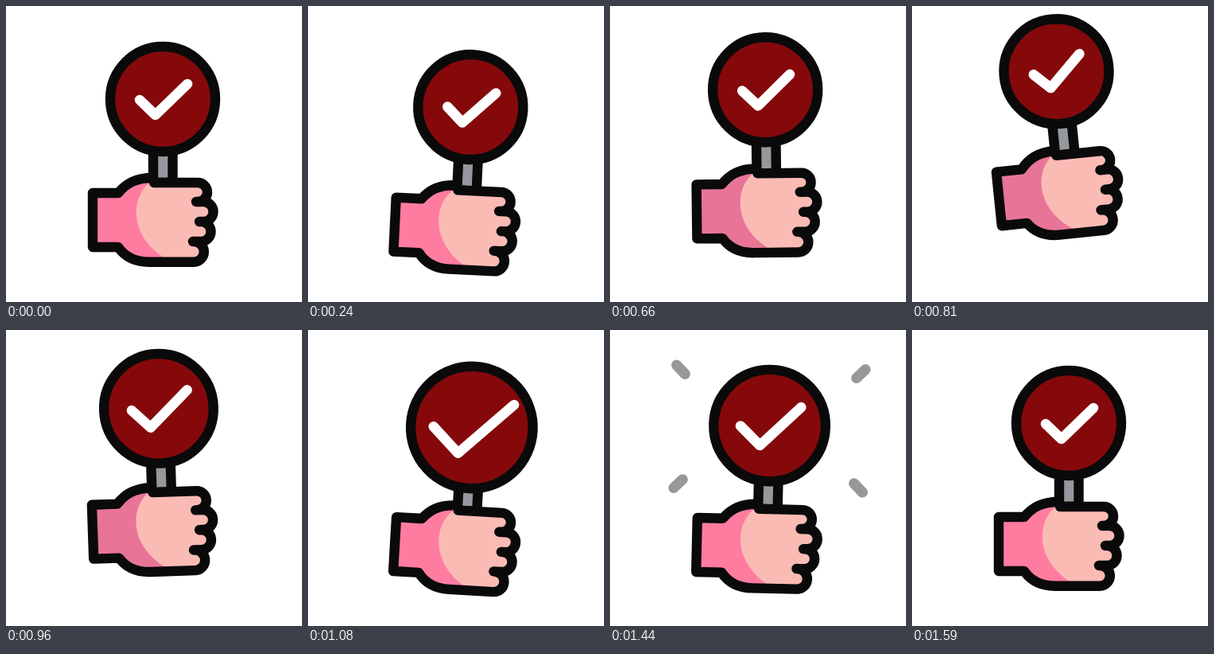
Write an HTML page that moves like this. It is 372x372 px and loops after 1620 ms.

```html
<!DOCTYPE html>
<html lang="en">
<head>
<meta charset="utf-8">
<title>Approval paddle</title>
<style>
  html, body { margin: 0; width: 100%; height: 100%; overflow: hidden; background: #fff; }
  svg { display: block; width: 100vw; height: 100vh; }
  .ink { stroke: #0a0a0a; stroke-width: 12.4; stroke-linecap: round; stroke-linejoin: round; }
  #marks { stroke-width: 13.2; }
  #check { fill: none; stroke: #fff; stroke-width: 12.6; stroke-linecap: round; stroke-linejoin: round; }
</style>
</head>
<body>
<svg viewBox="0 0 372 372">
  <defs>
    <path id="fist" d="M184 216 C163 216 151 223 141 235 H109 V303 H141 C150 316 164 321.7 180 321.7 H236
      A12.8 12.8 0 0 0 236 296 H235 H245 A12.5 12.5 0 0 0 245 271 H243 H248 A12.5 12.5 0 0 0 248 246
      H239 H241 A12 12 0 0 0 241 222 H186"/>
    <clipPath id="inside"><use href="#fist"/></clipPath>
  </defs>
  <g id="paddle">
    <g id="marks" class="ink"></g>
    <rect class="ink" x="185" y="180" width="24.5" height="42" fill="#95999d"/>
    <g transform="translate(197 117)">
      <circle id="disc" class="ink" fill="#85090b"/>
      <path id="check"/>
    </g>
    <use id="skin" href="#fist"/>
    <path clip-path="url(#inside)" fill="#fbbbb5" d="M183 220 C154 240 154 295 209 322 H270 V215 H183 Z"/>
    <use class="ink" href="#fist" fill="none"/>
  </g>
</svg>
<script>
  const LOOP = 1620, REST = 1590;
  const $ = id => document.getElementById(id);
  const clamp = x => Math.min(1, Math.max(0, x));

  // Key poses: time in ms, tilt in degrees, drop in pixels.
  const poses = [
    [0, 0, 0], [150, 0, 0],
    [410, 7.9, 26.5],   // dip
    [845, -7, -39.5],   // lift
    [1105, 4.4, 9],     // stamp
    [REST, 0, 0], [LOOP, 0, 0],
  ];

  function poseAt(t) {
    const i = poses.findIndex(([time]) => time > t);
    const from = poses[i - 1], to = poses[i];
    const k = (t - from[0]) / (to[0] - from[0]);
    return from.map((v, n) => v + (to[n] - v) * k);
  }

  const tick = [[-29, 1], [-9.3, 20], [31, -19]];
  const corners = [[-1, -1], [1, -1], [1, 1], [-1, 1]];
  const dashes = corners.map(() =>
    $('marks').appendChild(document.createElementNS('http://www.w3.org/2000/svg', 'path')));

  function draw(t) {
    const [, tilt, drop] = poseAt(t);
    $('paddle').setAttribute('transform', `translate(0 ${drop}) rotate(${tilt} 185 269)`);
    $('skin').setAttribute('fill', drop < 0 ? '#e87597' : '#ff7ca1');

    // The disc swells fast and shrinks back slowly; the tick grows more than the disc.
    const swell = Math.max(0, Math.min((t - 918) / 158, (REST - t) / 365));
    $('disc').setAttribute('r', 66 + 10.4 * swell);
    const scale = 1 + 0.64 * swell;
    $('check').setAttribute('d', 'M' + tick.map(p => p.map(v => v * scale)).join('L'));

    // Dashes burst diagonally from behind the disc, slowing down as they fade.
    const burst = clamp((t - 1100) / 460);
    const out = 18 - 64 * (1 - burst) ** 2;
    $('marks').setAttribute('opacity', burst && clamp((REST - t) / 360));
    dashes.forEach((dash, i) => {
      const [sx, sy] = corners[i];
      const end = k => `${197 + sx * (99.5 + out + k)} ${121 + sy * (58 + out + k)}`;
      dash.setAttribute('d', `M${end(-5.5)}L${end(5.5)}`);
    });
  }

  const start = performance.now();
  function play() {
    draw((performance.now() - start) % LOOP);
    requestAnimationFrame(play);
  }
  play();
</script>
</body>
</html>
```
